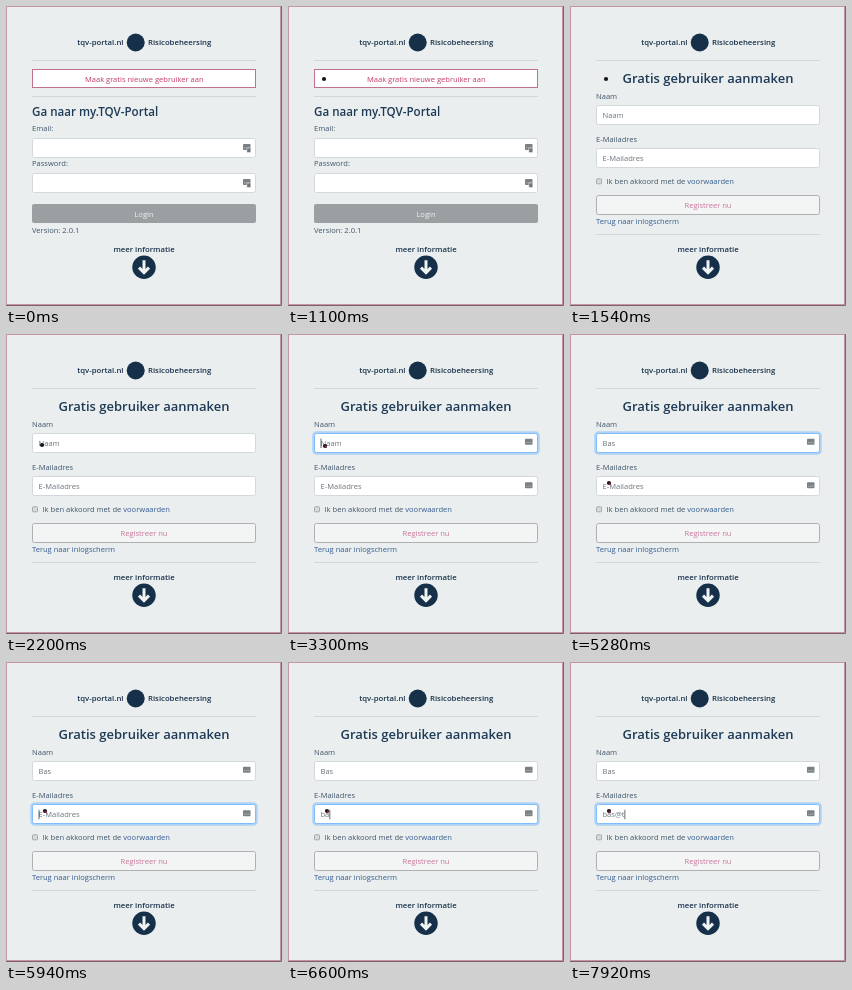
Write an HTML page that moves like this. It is 276 by 300 pixels and loops after 8000 ms.

```html
<!DOCTYPE html>
<html lang="nl">
<head>
<meta charset="utf-8">
<title>Registreren</title>
<style>
  html, body { margin: 0; width: 100%; height: 100%; overflow: hidden; background: #ebeeee; }
  svg { display: block; width: 276px; height: 300px; }
  text { font: 7.55px "Open Sans", "Noto Sans", sans-serif; fill: #3f556c; white-space: pre; }
  .strong { font-size: 7.75px; font-weight: 600; fill: #17304a; }
  .title { font-size: 13px; font-weight: 600; fill: #1d3a56; }
  .subtitle { font-size: 11.6px; font-weight: 600; fill: #1d3a56; }
  .mid { text-anchor: middle; }
  .pink { fill: #c03a6b; }
  .palepink { fill: #c8759a; }
  .link { fill: #335c92; }
  .white { fill: #f4f5f5; }
  .value { fill: #6c747c; }
  .rule { stroke: #d2d7d9; }
  .field { fill: #fff; stroke: #d3d8dc; }
  .focus { stroke: #80bdff; }
  .glow { fill: none; stroke: #b0d2f3; stroke-width: 2.5; }
</style>
</head>
<body>
<svg viewBox="0 0 276 300">
  <rect width="276" height="300" fill="#ebeeee"/>
  <path d="M0 .5H276M.5 0V300M0 298.5H276M274.5 0V300" fill="none" stroke="#c295a6"/>
  <path d="M0 299.5H275.5V0" fill="none" stroke="#80606f"/>

  <text class="strong" x="117.5" y="38.5" text-anchor="end">tqv-portal.nl</text>
  <circle cx="129.7" cy="36.5" r="9" fill="#17304a"/>
  <text class="strong" x="142" y="38.5">Risicobeheersing</text>
  <path class="rule" d="M26 54.5H250"/>

  <g id="login">
    <rect x="26.5" y="63.5" width="223" height="18" fill="#fff" stroke="#c0718f"/>
    <text class="mid pink" x="138.3" y="75.5">Maak gratis nieuwe gebruiker aan</text>
    <path class="rule" d="M26 90.5H250"/>
    <text class="subtitle" x="26" y="110.3">Ga naar my.TQV-Portal</text>
    <text x="26" y="125.3">Email:</text>
    <rect class="field" x="26.5" y="132.5" width="223" height="19" rx="2"/>
    <text x="26" y="160.3">Password:</text>
    <rect class="field" x="26.5" y="167.5" width="223" height="19" rx="2"/>
    <use href="#key" x="237" y="138"/><use href="#badge" x="237" y="138"/>
    <use href="#key" x="237" y="173"/><use href="#badge" x="237" y="173"/>
    <rect x="26" y="198" width="224" height="19" rx="2" fill="#9a9fa2"/>
    <text class="mid white" x="138" y="211">Login</text>
    <text x="26" y="226.5">Version: 2.0.1</text>
  </g>

  <g id="register">
    <text class="title mid" x="138" y="77">Gratis gebruiker aanmaken</text>
    <text x="26" y="92.5">Naam</text>
    <rect class="glow" id="nameGlow" x="25.5" y="98.5" width="225" height="21" rx="3"/>
    <rect class="field" id="nameField" x="26.5" y="99.5" width="223" height="19" rx="2"/>
    <text class="value" id="name" x="32.5" y="112.3"></text>
    <text x="26" y="135.5">E-Mailadres</text>
    <rect class="glow" id="mailGlow" x="25.5" y="141.5" width="225" height="21" rx="3"/>
    <rect class="field" id="mailField" x="26.5" y="142.5" width="223" height="19" rx="2"/>
    <text class="value" id="mail" x="32.5" y="155.2"></text>
    <g id="keys"><use href="#key" x="237" y="104.8"/><use href="#key" x="237" y="148.3"/></g>
    <rect x="26.5" y="172.8" width="5" height="5" rx=".8" fill="#d9dcde" stroke="#a3a9ad"/>
    <text x="36.5" y="178">Ik ben akkoord met de <tspan class="link">voorwaarden</tspan></text>
    <rect x="26.5" y="189.5" width="223" height="19" rx="2" fill="#f3f5f5" stroke="#aeb0b6"/>
    <text class="mid palepink" x="138" y="202">Registreer nu</text>
    <text class="link" x="26" y="217.7">Terug naar inlogscherm</text>
    <path class="rule" d="M26 228.5H250"/>
    <path id="caret" stroke="#39424a" stroke-width=".8"/>
  </g>

  <text class="strong mid" x="138" y="246.3">meer informatie</text>
  <circle cx="138" cy="261.2" r="11.7" fill="#17304a"/>
  <path d="M138 254.3V266M133 261.6L138 266.6L143 261.6" fill="none" stroke="#f0f3f4" stroke-width="3"/>

  <g id="pointer">
    <circle r="2.1" fill="#15151a"/>
    <circle id="press" cx=".7" cy=".7" r="1.2" fill="#8c2238"/>
  </g>

  <defs>
    <g id="key">
      <rect width="7.5" height="6" rx=".8" fill="#7b8084"/>
      <path d="M1.2 3.8H6.3" stroke="#c5c9cb" stroke-width=".8" stroke-dasharray="1.2 .8"/>
    </g>
    <rect id="badge" x="3.8" y="4" width="4" height="4.6" rx=".5" fill="#707579" stroke="#fff" stroke-width=".5"/>
  </defs>
</svg>
<script>
const LOOP = 8000, STEP = 220;
const $ = id => document.getElementById(id);
const show = (id, on) => $(id).style.display = on ? "" : "none";

// Each track lists [start time, value]; the latest started entry applies.
const tracks = {
  pointer: [[0, null], [880, [36, 73]], [1760, [36, 92]], [1980, [36, 111]],
            [2640, [37, 112]], [3740, null], [4840, [38, 132]], [5060, [39, 149]]],
  name: [[0, ""], [3960, "B"], [4180, "Ba"], [4400, "Bas"]],
  mail: [[0, ""], [6380, "b"], [6600, "ba"], [6820, "bas"], [7480, "bas@"], [7920, "bas@t"]],
  focus: [[0, null], [2640, "name"], [5500, "mail"]]
};
const at = (track, t) => tracks[track].filter(([start]) => start <= t).pop()[1];

function setField(id, value, placeholder, focused) {
  $(id).textContent = value || placeholder;
  $(id + "Field").classList.toggle("focus", focused);
  show(id + "Glow", focused);
}

function draw(time) {
  const t = Math.floor(time / STEP) * STEP;
  const registering = t >= 1540;
  show("login", !registering);
  show("register", registering);
  show("keys", t >= 2640);

  const focus = at("focus", t);
  setField("name", at("name", t), "Naam", focus === "name");
  setField("mail", at("mail", t), "E-Mailadres", focus === "mail");

  const caretOn = registering && focus && !(t >= 4840 && t < 5500);
  show("caret", caretOn);
  if (caretOn) {
    const width = at(focus, t) ? $(focus).getComputedTextLength() : 0;
    const y = focus === "name" ? 104.5 : 147.8;
    $("caret").setAttribute("d", `M${33 + width} ${y}v9.5`);
  }

  const spot = at("pointer", t);
  show("pointer", spot);
  if (spot) $("pointer").setAttribute("transform", `translate(${spot})`);
  show("press", t >= 2420);
}

const begin = performance.now();
function tick() {
  draw((performance.now() - begin) % LOOP);
  requestAnimationFrame(tick);
}
tick();
</script>
</body>
</html>
```
